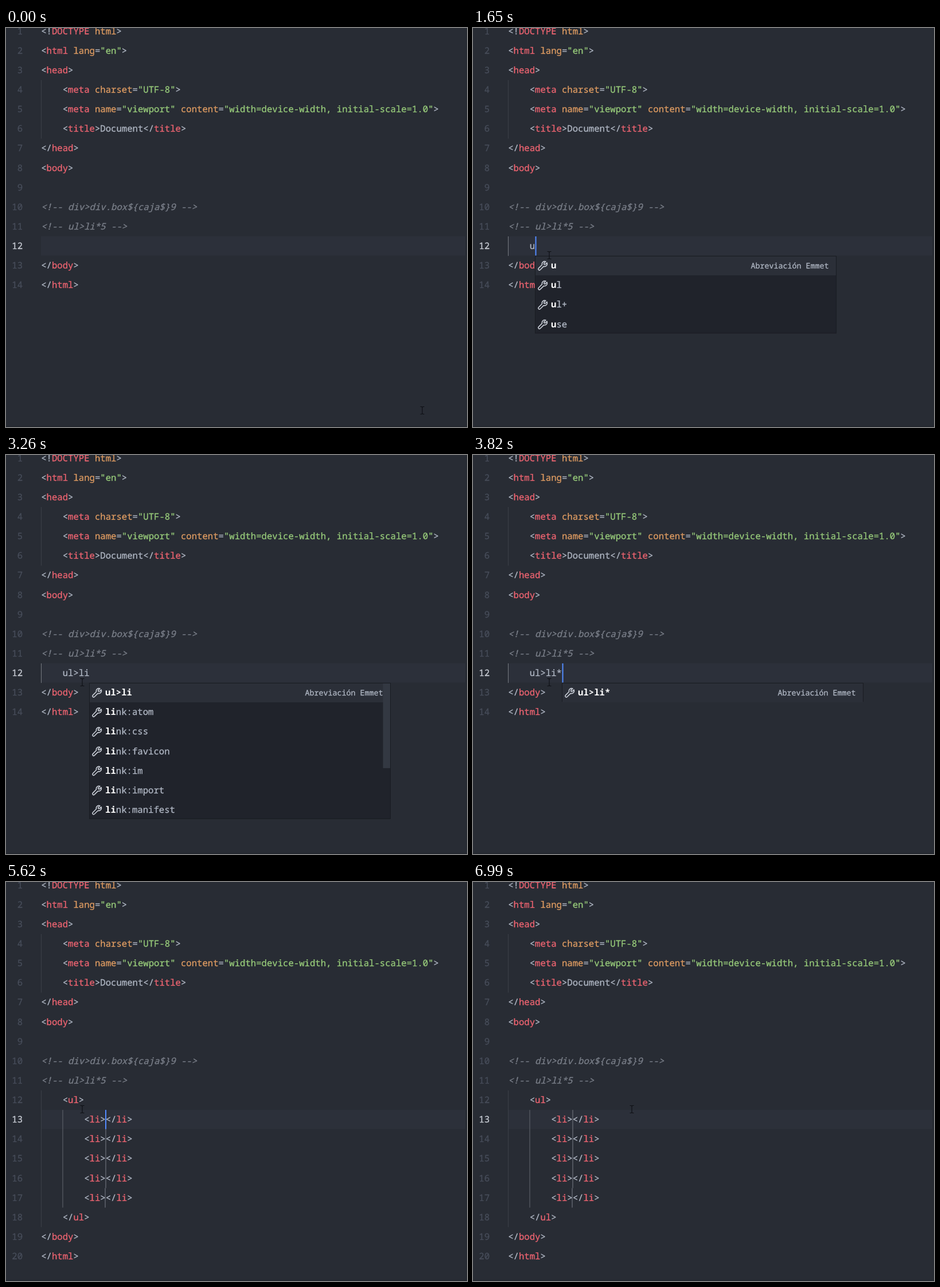
An HTML page for the animation above (7.04 s loop, 804 px wide and 697 px high).

```html
<!DOCTYPE html>
<html lang="en">
<head>
<meta charset="UTF-8">
<title>Emmet abbreviation</title>
<style>
html, body { margin: 0; width: 100%; height: 100%; overflow: hidden; background: #282c34; }
svg { display: block; width: 804px; height: 697px; }
text {
  font: 15.64px "Noto Sans Mono", "DejaVu Sans Mono", monospace;
  font-variant-ligatures: none;
  white-space: pre;
  text-rendering: geometricPrecision;
  color: #b0b7c4;
}
text, tspan { fill: currentColor; stroke: currentColor; stroke-width: .3px; }
.tag { color: #ee6471; }
.attr { color: #df9c62; }
.str { color: #97cb7a; }
.note { color: #7a7f89; font-style: italic; }
.num { color: #474d5a; text-anchor: end; }
.num.on { color: #c8ccd4; }
.hit { color: #fff; font-weight: 700; stroke: none; }
.detail { font-size: 13.33px; text-anchor: end; }
</style>
</head>
<body>
<svg viewBox="0 0 804 697">
  <defs>
    <path id="wrench" fill="none" stroke="#c8cdd6" stroke-width="1.6" stroke-linejoin="round"
      d="M16.5 3.5L13.5 6.5L11.5 6.3L11.3 4.4L14.3 1.4C11 .2 7 2.6 8 7L1.7 13.4C.3 15 2.8 17.6 4.4 16.2L10.8 9.9C15 11 18 7 16.5 3.5Z"/>
  </defs>
  <rect width="804" height="697" fill="#282c34"/>
  <path d="M802.5 0V697" stroke="#23272e"/>
  <rect y="695" width="804" height="2" fill="#23272e"/>
  <g id="views"></g>
  <rect id="caret" width="2" height="33.5" fill="#528bff"/>
  <g id="popups"></g>
  <path id="mouse" fill="none" stroke="#0e1014" stroke-width="1.1"
    d="M-3.5 -6.5H-1.2L0 -5.5L1.2 -6.5H3.5M0 -5.5V5.5M-3.5 6.5H-1.2L0 5.5L1.2 6.5H3.5"/>
</svg>
<script>
const LOOP = 7040, LEFT = 61.2, CHAR = 9.384, PITCH = 34.13, BLINK = 500;
const $ = id => document.getElementById(id);
const rowTop = n => 364 + (n - 12) * PITCH;
const baseline = n => rowTop(n) + 22.1;
const colX = c => LEFT + c * CHAR;
const esc = s => s.replace(/&/g, '&amp;').replace(/</g, '&lt;').replace(/>/g, '&gt;');
const span = (cls, s) => `<tspan class="${cls}">${esc(s)}</tspan>`;
const rect = (x, y, w, h, fill) => `<rect x="${x}" y="${y}" width="${w}" height="${h}" fill="${fill}"/>`;
const label = (x, row, body, cls = '') => `<text x="${x}" y="${baseline(row)}" class="${cls}">${body}</text>`;

const head = [
  '<!DOCTYPE html>',
  '<html lang="en">',
  '<head>',
  '    <meta charset="UTF-8">',
  '    <meta name="viewport" content="width=device-width, initial-scale=1.0">',
  '    <title>Document</title>',
  '</head>',
  '<body>',
  '',
  '<!-- div>div.box${caja$}9 -->',
  '<!-- ul>li*5 -->'
];
const tail = ['</body>', '</html>'];
const list = ['    <ul>', ...Array(5).fill('        <li></li>'), '    </ul>'];

const links = ['link:atom', 'link:css', 'link:favicon', 'link:im', 'link:import', 'link:manifest'];

// at: start time, typed: text on row 12, items: suggestions below the first one
const steps = [
  { at: 0, typed: '', blinkFrom: -100 - BLINK },
  { at: 780, typed: '' },
  { at: 1560, typed: 'u', prefix: 'u', items: ['ul', 'ul+', 'use'] },
  { at: 1760, typed: 'ul', prefix: 'ul', items: ['ul+'] },
  { at: 1980, typed: 'ul>' },
  { at: 2220, typed: 'ul>l', prefix: 'l', items: ['leg', ...links.slice(0, 5)] },
  { at: 2660, typed: 'ul>li', prefix: 'li', items: links, bar: true },
  { at: 3500, typed: 'ul>li*', prefix: '', items: [] },
  { at: 3850, typed: 'ul>li*5', prefix: '', items: [] },
  { at: 4300, done: true }
];

function paint(line) {
  if (line.startsWith('<!--')) return span('note', line);
  let inTag = false, named = false;
  return line.replace(/<[!\/]?|>|=|"[^"]*"|[^<>="\s]+|\s+/g, part => {
    if (part[0] === '<') { inTag = true; named = false; return esc(part); }
    if (part === '>') { inTag = false; return esc(part); }
    if (!inTag || part === '=' || !part.trim()) return part;
    if (part[0] === '"') return span('str', part);
    if (named) return span('attr', part);
    named = true;
    return span('tag', part);
  });
}

function guide(col, from, to, color, shift = 0, width = 1) {
  return rect(Math.floor(colX(col)) + shift, rowTop(from), width, (to - from + 1) * PITCH, color);
}

function view(step) {
  const middle = step.done ? list : [step.typed && '    ' + step.typed];
  const active = step.done ? 13 : 12;
  let out = rect(61, rowTop(active), 740, 33.5, '#2c303a');
  out += guide(0, 4, 6, '#3b4048');
  if (step.done) {
    out += guide(0, 12, 18, '#3b4048') + guide(4, 13, 17, '#62666f', .5);
    out += guide(12, 13, 16, '#51555e', 0, 2) + guide(12, 17, 17, '#51555e', -1, 2);
  } else if (step.typed) {
    out += guide(0, 12, 12, '#757980');
  }
  [...head, ...middle, ...tail].forEach((line, i) => {
    const n = i + 1;
    out += label(29, n, n, n === active ? 'num on' : 'num');
    out += label(LEFT, n, paint(line));
  });
  return out;
}

function popup(step) {
  if (!step.items) return '';
  const x = Math.floor(colX(4 + step.typed.length)), w = 525;
  const rows = [step.typed, ...step.items];
  const h = rows.length * PITCH - 2;
  let out = `<rect x="${x + .5}" y="398.5" width="${w}" height="${h}" fill="#20232b" stroke="#191c22"/>`;
  out += rect(x + 1, 399, w - 1, 33, '#2b2f38');
  rows.forEach((item, i) => {
    const cut = i ? step.prefix.length : item.length;
    out += `<use href="#wrench" x="${x + 4.5}" y="${rowTop(13 + i) + 8.4}"/>`;
    out += label(x + 28, 13 + i, span('hit', item.slice(0, cut)) + esc(item.slice(cut)));
  });
  out += label(x + w - 12.5, 13, 'Abreviación Emmet', 'detail');
  if (step.bar) out += rect(x + w - 12.5, 399, 12.5, 148, '#333842');
  return out;
}

$('views').innerHTML = steps.map(s => `<g>${view(s)}</g>`).join('');
$('popups').innerHTML = steps.map(s => `<g>${popup(s)}</g>`).join('');

const path = [
  [0, 726, 668], [90, 726, 668], [680, 132, 397], [850, 132, 397],
  [1000, 133, 397], [6620, 133, 397], [6980, 277, 397], [LOOP, 277, 397]
];
const ease = p => p * p * (3 - 2 * p);

function mouseAt(t) {
  const i = path.findIndex(p => p[0] > t);
  const [t0, x0, y0] = path[i - 1], [t1, x1, y1] = path[i];
  const p = ease((t - t0) / (t1 - t0));
  return [x0 + (x1 - x0) * p, y0 + (y1 - y0) * p];
}

function draw(now) {
  const t = now % LOOP;
  const current = steps.findLastIndex(s => s.at <= t);
  const step = steps[current];
  for (const id of ['views', 'popups']) {
    [...$(id).children].forEach((g, i) => g.style.display = i === current ? '' : 'none');
  }
  const phase = Math.floor((t - (step.blinkFrom ?? step.at)) / BLINK);
  const caret = $('caret');
  caret.style.display = phase % 2 ? 'none' : '';
  caret.setAttribute('x', step.done ? 173 : Math.floor(colX(4 + step.typed.length)) + .5);
  caret.setAttribute('y', rowTop(step.done ? 13 : 12));
  $('mouse').setAttribute('transform', `translate(${mouseAt(t)})`);
}

const start = performance.now();
function tick() {
  draw(performance.now() - start);
  requestAnimationFrame(tick);
}
tick();
</script>
</body>
</html>
```
